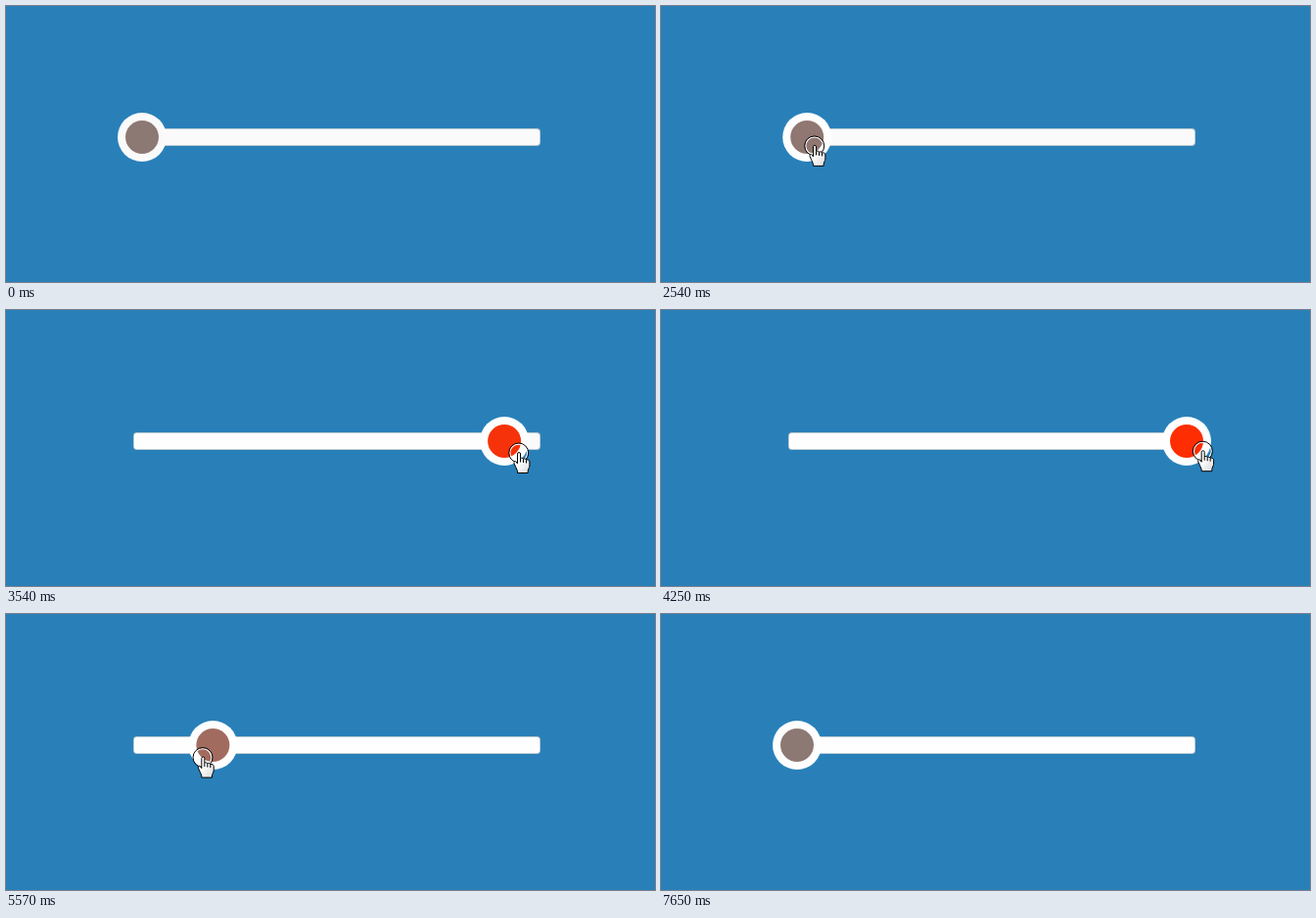
An HTML page that plays this animation: 663x282 px, repeating every 9040 ms.

```html
<!DOCTYPE html>
<html lang="en">
<head>
<meta charset="utf-8">
<title>Slider</title>
<style>
  html, body { margin: 0; width: 100%; height: 100%; overflow: hidden; background: #2980b9; }
  svg { display: block; width: 100%; height: 100%; }
</style>
</head>
<body>
<svg viewBox="0 0 663 282">
  <linearGradient id="shade" x1="0" y1="0" x2="1" y2="1">
    <stop offset=".4" stop-color="#fff"/>
    <stop offset="1" stop-color="#d8d8d8"/>
  </linearGradient>
  <clipPath id="groove"><rect x="131" y="126" width="414" height="16" rx="3"/></clipPath>

  <rect width="663" height="282" fill="#2980b9"/>
  <rect x="130" y="125" width="416" height="18" rx="4" fill="#bccbd4"/>
  <g clip-path="url(#groove)">
    <rect x="130" y="125" width="416" height="18" fill="#fafafa"/>
    <rect id="bright" x="130" y="125" width="0" height="18" fill="#fefefe"/>
  </g>
  <g id="knob">
    <circle id="rim" r="25"/>
    <circle id="core" r="17"/>
  </g>
  <g id="pointer">
    <g id="ring" fill="none">
      <circle cx=".5" cy="1" r="9" stroke="#fff" stroke-width="1.3"/>
      <circle cx=".5" cy="1" r="10" stroke="#000"/>
    </g>
    <g id="hand" stroke="#000" stroke-linejoin="round" transform="translate(.6 0)">
      <path fill="url(#shade)" d="M-1.3 2a1.5 1.5 0 0 1 3 0V6.6c1-.7 2.6-.4 3 .6c1-.6 2.6-.2 3 .9c1.5-.5 3.4.2 3.4 1.9V14c0 2-1.5 3.6-1.7 5.2V21.5H-1.3V19.5C-2.2 17.3-3.8 14-4.8 11.6C-5.4 9.6-3.2 9-2.4 10.4L-1.3 12Z"/>
      <path fill="none" d="M1.7 6.6V10.5M4.7 7.2V11M7.7 8.2V11.5"/>
    </g>
    <path id="arrow" fill="#fff" stroke="#000" d="M.5 .8V16.6L4.2 13.2L6.5 18.5L8.8 17.5L6.5 12.2H11.5Z"/>
  </g>
</svg>
<script>
const LOOP = 9040, LAG = 45;
const ENTER = 1270, PRESS = 2180, DRAG = 2420, RELEASE = 6710, LEAVE = 7650;
const LEFT = 139, RIGHT = 537, MID = 134, RADIUS = 25;
const COLD = [141, 121, 116], HOT = [254, 45, 2];

// Each stroke starts where the last one ended; ease holds two Bezier heights, bow bends the path
const origin = { x: 221, y: 278 };
const strokes = [
  { start: ENTER, end: 2030, x: 140.5, y: 141, ease: [0.5, 1], bow: 0 },
  { start: 2370, end: 3870, x: 577, y: 144, ease: [0, 1], bow: 2 },
  { start: 4130, end: 6120, x: 104, y: 151, ease: [0.26, 0.86], bow: -5 },
  { start: 7110, end: LEAVE, x: 104, y: 282, ease: [0.1, 0.7], bow: 0 }
];

const $ = id => document.getElementById(id);
const clamp = (v, lo, hi) => Math.min(hi, Math.max(lo, v));
const mix = (a, b, k) => a + (b - a) * k;
const show = (id, on) => $(id).setAttribute('visibility', on ? 'visible' : 'hidden');
const move = (id, x, y) => $(id).setAttribute('transform', `translate(${x.toFixed(2)} ${y.toFixed(2)})`);

function bezier(u, [a, b]) {
  const v = 1 - u;
  return 3 * a * u * v * v + 3 * b * u * u * v + u * u * u;
}

function pointerAt(t) {
  let { x, y } = origin;
  for (const s of strokes) {
    const u = clamp((t - s.start) / (s.end - s.start), 0, 1);
    const k = bezier(u, s.ease);
    x = mix(x, s.x, k);
    y = mix(y, s.y, k) + s.bow * 4 * u * (1 - u);
  }
  return { x, y };
}

// The knob trails the pointer and stops at both ends of the track
const knobAt = t => t < DRAG ? LEFT : clamp(pointerAt(t - LAG).x, LEFT, RIGHT);

function draw(t) {
  const { x, y } = pointerAt(t), knob = knobAt(t);
  const heat = (knob - LEFT) / (RIGHT - LEFT);
  const rgb = COLD.map((c, i) => Math.round(mix(c, HOT[i], heat)));
  const dragged = t >= DRAG;

  move('knob', knob, MID);
  $('rim').setAttribute('fill', dragged ? '#fefefe' : '#fafafa');
  $('core').setAttribute('fill', `rgb(${rgb})`);
  // The track brightens as far as the knob has been
  const reach = knobAt(Math.min(t, strokes[2].start));
  $('bright').setAttribute('width', dragged ? reach + RADIUS - 130 : 0);

  const here = t >= ENTER && t < LEAVE;
  const over = x > LEFT - RADIUS && x < RIGHT + RADIUS && Math.abs(y - MID) < RADIUS;
  move('pointer', x, y);
  show('hand', here && over);
  show('arrow', here && !over);
  show('ring', t >= PRESS && t < RELEASE);
}

const begin = performance.now();
function tick() {
  draw((performance.now() - begin) % LOOP);
  requestAnimationFrame(tick);
}
tick();
</script>
</body>
</html>
```
